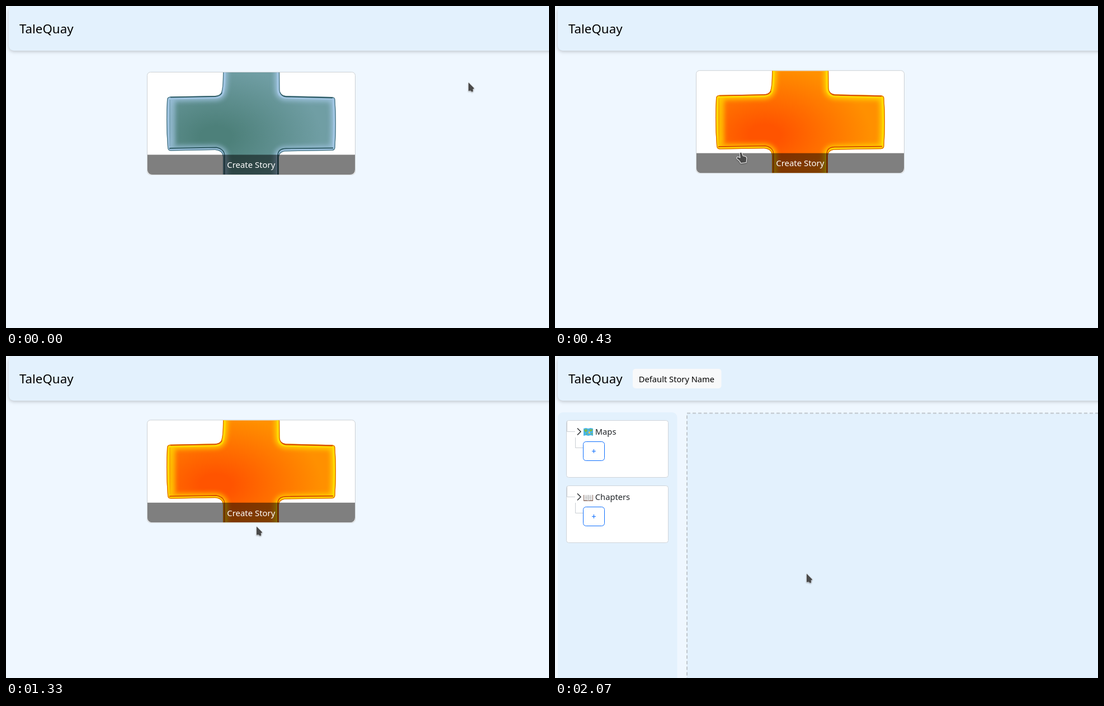
An HTML page that plays this animation: 971x577 px, repeating every 2.36 s.

```html
<!DOCTYPE html>
<html lang="en">
<head>
<meta charset="utf-8">
<title>Story editor</title>
<style>
  html, body { margin: 0; width: 100%; height: 100%; overflow: hidden; background: #eff7ff; }
  svg { display: block; width: 971px; height: 577px; font: 14.7px "Noto Sans", sans-serif; }
  .panel { fill: #e3f1fd; }
  .line { fill: none; stroke: #c9ced3; }
  .deep { stop-color: var(--deep); }
  .mid { stop-color: var(--mid); }
  .rim { fill: none; stroke: var(--light); }
  .edge { fill: none; stroke: var(--edge); }
  .pointer { fill: #4a4a4a; stroke: #fff; stroke-linejoin: round; paint-order: stroke; filter: drop-shadow(0 1px 1px #0006); }
</style>
</head>
<body>
<svg viewBox="0 0 971 577">
  <defs>
    <radialGradient id="body" gradientUnits="userSpaceOnUse" cx="375" cy="234" r="190" gradientTransform="translate(0 82) scale(1 .65)">
      <stop class="deep" offset="0"/>
      <stop class="deep" offset=".15"/>
      <stop class="mid" offset="1"/>
    </radialGradient>
    <filter id="soft" filterUnits="userSpaceOnUse" x="240" y="90" width="400" height="240"><feGaussianBlur stdDeviation="4"/></filter>
    <filter id="fine" filterUnits="userSpaceOnUse" x="240" y="90" width="400" height="240"><feGaussianBlur stdDeviation=".7"/></filter>
    <path id="plus" d="M388 100V119C388 140 387 150 384.5 156Q382 160.5 374 161L294 162.5Q288 163 288 168Q285.5 210 289 254
      Q289.5 259.5 295 259.5L374 258Q387 259 388 270V330H488V270Q489 262 498 260.5L583 259Q588 259 588.5 254
      Q591.5 210 588.5 168Q588.5 163.5 583 163L500 161Q490 160 489.5 150L489 100Z"/>
    <clipPath id="plusClip"><use href="#plus"/></clipPath>
    <clipPath id="cardClip"><path d="M253 125Q253 119 259 119H618Q624 119 624 125V293Q624 302 615 302H262Q253 302 253 293Z"/></clipPath>
    <g id="group">
      <rect x="20.5" y="115.5" width="182" height="102" rx="4" fill="#fff" stroke="#ced4da"/>
      <path class="line" d="M21.5 117V135.5H36M36.5 146V164.5H50"/>
      <rect x="50.5" y="153.5" width="38" height="34" rx="5" fill="#fff" stroke="#0d6efd"/>
      <text x="69.5" y="176" text-anchor="middle" fill="#0d6efd">+</text>
      <path class="chevron" d="M40 129.5l6 6-6 6" fill="none" stroke="#212529" stroke-width="1.4"/>
    </g>
  </defs>

  <rect class="panel" x="5" y="0" width="990" height="80" rx="9" style="filter:drop-shadow(0 2px 3px #0003)"/>
  <text x="24" y="49" font-size="22.3">TaleQuay</text>

  <g id="card">
    <rect x="252.5" y="118.5" width="372" height="184" rx="6" fill="#fff" stroke="#ccd0d4"/>
    <g clip-path="url(#cardClip)">
      <g clip-path="url(#plusClip)">
        <use href="#plus" fill="url(#body)"/>
        <use href="#plus" class="rim" stroke-width="17" opacity=".75" filter="url(#soft)"/>
        <path class="rim" d="M298 168V250" stroke-width="8" opacity=".7" filter="url(#soft)"/>
        <use href="#plus" class="rim" stroke-width="10" opacity=".65" filter="url(#fine)"/>
        <use href="#plus" class="edge" stroke-width="2.6" opacity=".75" filter="url(#fine)"/>
        <path class="edge" d="M294 163.5L374 162Q384 161 386 155M491 155Q493 162 501 162.5L584 164.5
          M292 255L376 253.5Q390 256 391 268V302M486 302V268Q486 256 500 255.5L585 254.5" stroke-width="1.8" filter="url(#fine)"/>
        <path class="edge" d="M293 168V252" opacity=".4" filter="url(#fine)"/>
      </g>
      <rect x="252" y="266.5" width="373" height="36" fill="#000" opacity=".5"/>
    </g>
    <text x="438.3" y="290.3" text-anchor="middle" font-size="14.9" font-weight="500" fill="#fff">Create Story</text>
  </g>

  <g id="editor">
    <rect x="139" y="23" width="158.5" height="35" rx="5" fill="#f8f9fa"/>
    <text x="149.8" y="46.6">Default Story Name</text>
    <rect class="panel" x="5" y="101" width="213.5" height="500" rx="9"/>
    <rect class="panel" x="236" y="102.5" width="800" height="600" stroke="#bfc6cc" stroke-width="2" stroke-dasharray="6 4"/>
    <use href="#group"/>
    <use href="#group" y="117"/>
    <g fill="#212529">
      <text x="71.8" y="141">Maps</text>
      <text x="71.8" y="258.3">Chapters</text>
    </g>
    <g transform="translate(51 129)">
      <path d="M0 1L4.2 0 8.5 1 12.8 0 17 1V14L12.8 13 8.5 14 4.2 13 0 14Z" fill="#48b5e6"/>
      <path d="M1 3L6 2 7 5 4 8 2 6ZM5 9L7 10 5 13ZM10 3L16 2 15 6 12 6ZM13 10L16 9V12Z" fill="#7fb84c"/>
      <path d="M9 6L12 7 11 11 9 9Z" fill="#f2c94c"/>
    </g>
    <g transform="translate(51 247)">
      <path d="M0 2H17V13H0Z" fill="#8d6e63"/>
      <path d="M1 1Q6 0 8.5 2Q11 0 16 1V11.5Q11 10.5 8.5 12.5Q6 10.5 1 11.5Z" fill="#f5f5f5"/>
      <path d="M2.5 4H7M2.5 6.5H7M2.5 9H7M10 4H14.5M10 6.5H14.5M10 9H14.5M8.5 2V12" stroke="#9e9e9e" stroke-width=".9"/>
    </g>
  </g>

  <path id="arrow" class="pointer" d="M0 0V15.3L3.2 14.5 6.6 17 8.4 15.3 7.6 12.3 10.3 10.4Z" stroke-width=".8"/>
  <path id="hand" class="pointer" stroke-width="2" d="M-1.8 1Q0 -1.2 1.8 .8L3.6 6.2 8 7.2Q10.4 8 10.2 10.5L9.4 17.2 .2 18.3Q-1.5 14 -6.6 10.6Q-7.6 8 -5 7.8L-.6 9.6Z"/>
</svg>
<script>
const LOOP = 2360, HOVER_FROM = 140, HOVER_TO = 1330, CARD_GONE = 1370, EDITOR_SHOWN = 1700, ICONS_SHOWN = 1970;

// Keys are [time, ...values]; repeated times make hard jumps.
const cursorKeys = [
  [30, 827, 137], [90, 735, 168], [180, 540, 222], [270, 376, 249], [350, 340, 261], [430, 332, 263],
  [530, 350, 252], [700, 447, 195], [1170, 447, 195], [1170, 445, 267], [1270, 445, 267], [1330, 448, 305],
  [1400, 452, 343], [1470, 453, 359], [1970, 453, 359], [1970, 451, 376], [2070, 451, 376], [2070, 450, 390]
];
const liftKeys = [[250, 0], [430, -2.8], [530, -4.4], [700, -4.8], [1170, -4.8], [1170, -3.7]];
const tintKeys = {
  deep: [[140, 77, 128, 122], [270, 48, 140, 82], [410, 255, 84, 0]],
  mid: [[140, 112, 158, 164], [270, 78, 172, 140], [410, 255, 144, 0]],
  light: [[140, 168, 203, 235], [270, 90, 222, 205], [410, 255, 228, 0]],
  edge: [[140, 45, 90, 98], [270, 12, 110, 85], [410, 215, 70, 0]]
};

function sample(keys, t) {
  const next = keys.findIndex(key => key[0] > t);
  if (next === 0) return keys[0].slice(1);
  if (next < 0) return keys[keys.length - 1].slice(1);
  const a = keys[next - 1], b = keys[next], p = (t - a[0]) / (b[0] - a[0]);
  return a.slice(1).map((v, i) => v + (b[i + 1] - v) * p);
}

const el = id => document.getElementById(id);
const show = (node, on) => node.style.display = on ? "" : "none";
const [card, editor, arrow, hand] = ["card", "editor", "arrow", "hand"].map(el);

function draw(t) {
  const place = `translate(${sample(cursorKeys, t)})`;
  const hovering = t >= HOVER_FROM && t < HOVER_TO;
  arrow.setAttribute("transform", place);
  hand.setAttribute("transform", place);
  show(arrow, !hovering);
  show(hand, hovering);

  card.setAttribute("transform", `translate(0 ${sample(liftKeys, t)})`);
  for (const name in tintKeys)
    document.documentElement.style.setProperty("--" + name, `rgb(${sample(tintKeys[name], t)})`);
  show(card, t < CARD_GONE);
  show(editor, t >= EDITOR_SHOWN);
  show(document.querySelector(".chevron"), t >= ICONS_SHOWN);
}

const start = performance.now();
function frame() {
  draw((performance.now() - start) % LOOP);
  requestAnimationFrame(frame);
}
draw(0);
requestAnimationFrame(frame);
</script>
</body>
</html>
```
